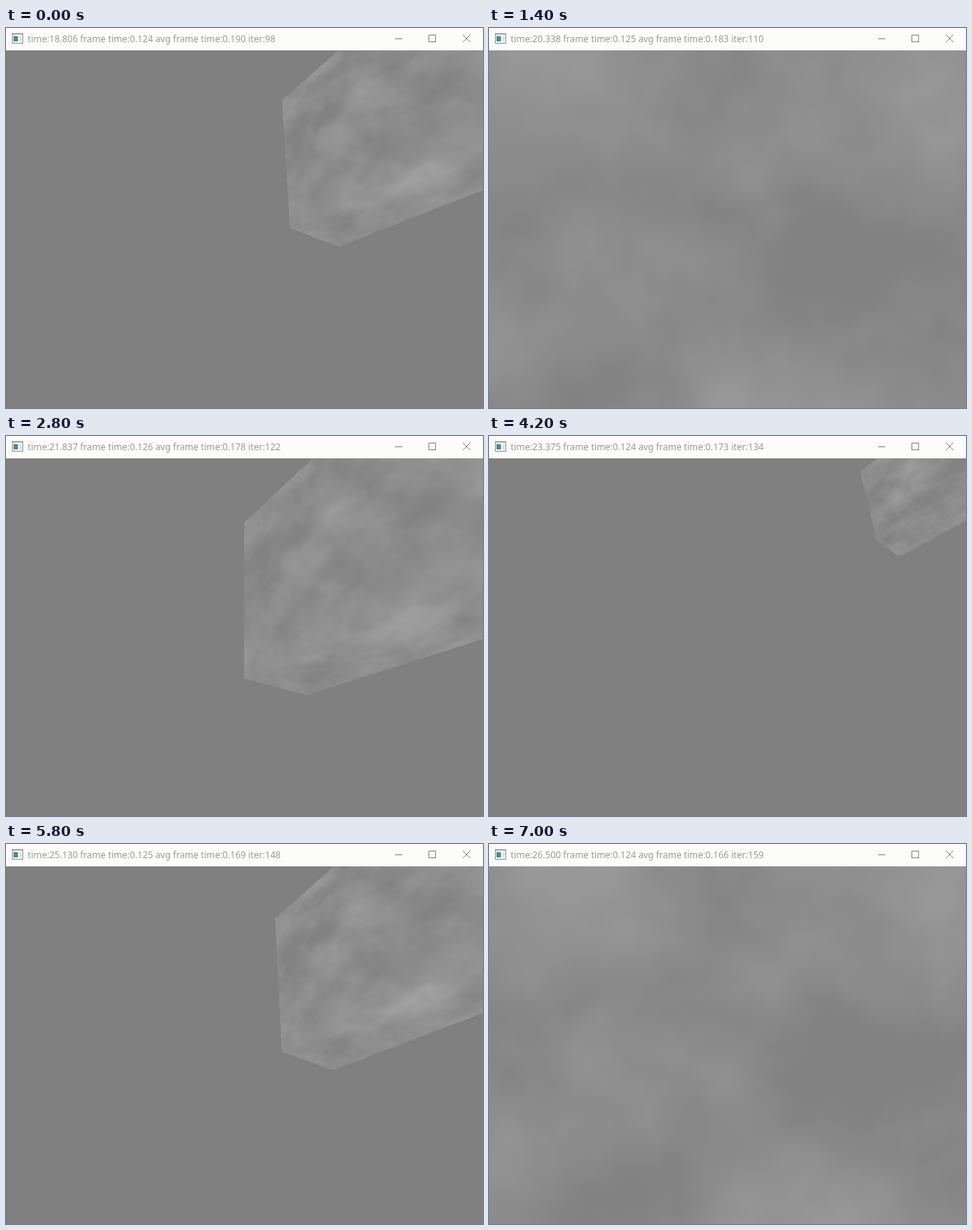
An HTML page with a canvas for the animation above (7100 ms loop, 639 by 510 pixels).

```html
<!DOCTYPE html>
<html lang="en">
<head>
<meta charset="utf-8">
<title>Volume fly-through</title>
<style>
  html, body { margin: 0; width: 100%; height: 100%; overflow: hidden; background: #808080; }
  #stage { position: relative; width: 639px; height: 510px; overflow: hidden; }
  #bar { position: absolute; left: 0; top: 0; width: 639px; height: 30px; background: #fcfcfa; }
  #view { position: absolute; left: 0; top: 30px; }
  svg { position: absolute; left: 0; top: 0; }
  #title { font: 12.2px "Noto Sans", "Open Sans", sans-serif; fill: #999; white-space: pre; }
</style>
</head>
<body>
<div id="stage">
  <div id="bar"></div>
  <svg width="639" height="30">
    <rect x="8.5" y="7.5" width="14" height="13" fill="#f4f5f6" stroke="#8d9299"/>
    <path d="M9 8.5h13" stroke="#b9bec6"/>
    <rect x="10" y="11" width="6" height="7" fill="#4f8c88"/>
    <path d="M18 12.5h3M18 14.5h3M18 16.5h3" stroke="#c9ccd0"/>
    <text id="title" x="29" y="19"></text>
    <g fill="none" stroke="#858585">
      <path d="M521 14.5h10"/>
      <rect x="566.5" y="9.5" width="9" height="9"/>
      <path d="M612 9l10 10M622 9l-10 10"/>
    </g>
  </svg>
  <canvas id="view" width="639" height="480"></canvas>
</div>
<script>
const LOOP = 7100, TICK = 100, FOCAL = 480;
const W = 639, H = 480, BACK = 128;
// ticks on which the slower renderer has no new picture
const HOLDS = [4, 11, 20, 27, 33, 41, 49, 57, 65];
// iteration, clock, frame time
const LOG = [
  [0, 18.806, .124], [12, 20.338, .125], [20, 21.335, .126], [24, 21.837, .126],
  [36, 23.375, .124], [50, 25.130, .125], [61, 26.500, .124]
];

// fixed camera orientation, axes (x, y, z)
const pitch = Math.atan(238 / FOCAL), yaw = .6613;
const cp = Math.cos(pitch), sp = Math.sin(pitch), cy = Math.cos(yaw), sy = Math.sin(yaw);
const RIGHT = [cy, 0, -sy];
const UP = [-sy * sp, cp, -cy * sp];
const FORWARD = [sy * cp, sp, cy * cp];
const LOW = [.751, .5035, -20], HIGH = [1.01, 1.1, .77];

const title = document.getElementById('title');
const ctx = document.getElementById('view').getContext('2d');
const image = ctx.createImageData(W, H);
const pixels = new Uint32Array(image.data.buffer);

// seeded permutation for value noise
const perm = new Uint8Array(512);
let seed = 77;
const random = () => (seed = (Math.imul(seed, 1664525) + 1013904223) >>> 0) / 4294967296;
for (let i = 0; i < 256; i++) perm[i] = i;
for (let i = 255; i > 0; i--) {
  const j = Math.floor(random() * (i + 1));
  [perm[i], perm[j]] = [perm[j], perm[i]];
}
perm.copyWithin(256, 0, 256);

const fade = t => t * t * (3 - 2 * t);
const mix = (a, b, t) => a + (b - a) * t;

function noise(x, y, z) {
  const fx = Math.floor(x), fy = Math.floor(y), fz = Math.floor(z);
  const u = fade(x - fx), v = fade(y - fy), w = fade(z - fz);
  const X = fx & 255, Y = fy & 255, Z = fz & 255;
  const a = perm[X] + Y, b = perm[X + 1] + Y;
  const a0 = perm[a & 255] + Z, a1 = perm[(a + 1) & 255] + Z;
  const b0 = perm[b & 255] + Z, b1 = perm[(b + 1) & 255] + Z;
  const near = mix(mix(perm[a0], perm[b0], u), mix(perm[a1], perm[b1], u), v);
  const far = mix(mix(perm[a0 + 1 & 511], perm[b0 + 1 & 511], u),
                  mix(perm[a1 + 1 & 511], perm[b1 + 1 & 511], u), v);
  return mix(near, far, w) / 255;
}

function cloud(x, y, z) {
  let sum = 0, amp = .5, f = 7;
  for (let i = 0; i < 4; i++, amp /= 2, f *= 2.03) sum += amp * noise(x * f + i * 17, y * f, z * f);
  return sum / .9375;
}

// distance to the box along a ray from (s, s, 0), or -1 for a miss
function enter(s, dx, dy, dz) {
  if (s > LOW[1] && dx < 0) return 0;
  const x0 = (LOW[0] - s) / dx, x1 = (HIGH[0] - s) / dx;
  const y0 = (LOW[1] - s) / dy, y1 = (HIGH[1] - s) / dy;
  const z0 = LOW[2] / dz, z1 = HIGH[2] / dz;
  const near = Math.max(0, Math.min(x0, x1), Math.min(y0, y1), Math.min(z0, z1));
  const far = Math.min(Math.max(x0, x1), Math.max(y0, y1), Math.max(z0, z1));
  return far > near ? near : -1;
}

function render(clock) {
  const s = Math.sin(clock);
  for (let j = 0, k = 0; j < H; j++) {
    const v = (239.5 - j) / FOCAL;
    for (let i = 0; i < W; i++, k++) {
      const u = (i - 319.5) / FOCAL;
      const dx = FORWARD[0] + u * RIGHT[0] + v * UP[0];
      const dy = FORWARD[1] + v * UP[1];
      const dz = FORWARD[2] + u * RIGHT[2] + v * UP[2];
      const t = enter(s, dx, dy, dz);
      let grey = BACK;
      if (t >= 0) {
        const d = t + .38;
        grey = Math.max(130, Math.round(118 + 48 * cloud(s + dx * d, s + dy * d, dz * d)));
      }
      pixels[k] = 0xff000000 | grey * 0x010101;
    }
  }
  ctx.putImageData(image, 0, 0);
}

function logAt(n, column) {
  let i = 1;
  while (LOG[i][0] < n) i++;
  const a = LOG[i - 1], b = LOG[i];
  return mix(a[column], b[column], (n - a[0]) / (b[0] - a[0]));
}

let shown = -1;
function draw() {
  const tick = Math.floor(performance.now() % LOOP / TICK);
  const n = tick - HOLDS.filter(h => h <= tick).length;
  if (n !== shown) {
    shown = n;
    const clock = logAt(n, 1), iter = 98 + n;
    const average = (clock - .165) / iter;
    title.textContent = `time:${clock.toFixed(3)} frame time:${logAt(n, 2).toFixed(3)}` +
      ` avg frame time:${average.toFixed(3)} iter:${iter}`;
    render(clock);
  }
  requestAnimationFrame(draw);
}
draw();
</script>
</body>
</html>
```
